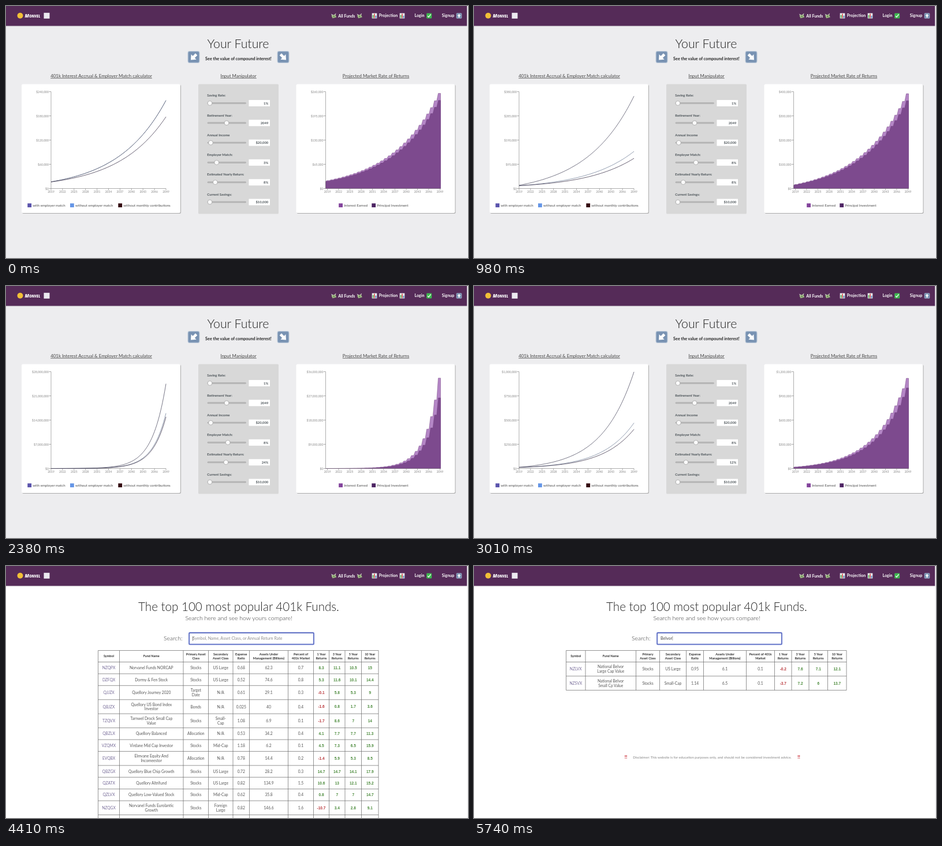
Write an HTML page that moves like this. It is 800x437 px and loops after 5810 ms.

```html
<!DOCTYPE html>
<html lang="en">
<head>
<meta charset="utf-8">
<title>Compound interest demo</title>
<style>
  html, body { margin: 0; width: 100%; height: 100%; overflow: hidden; background: #fff; }
  svg { display: block; width: 100vw; height: 100vh; }
  text { font-family: Lato, "Open Sans", sans-serif; white-space: pre; }
  .num { font-family: "Liberation Sans", sans-serif; }
  .brand { font-family: "Open Sans", sans-serif; font-style: italic; font-variant: small-caps; }
  .under { text-decoration: underline; text-decoration-thickness: .5px; text-underline-offset: 1.2px; }
</style>
</head>
<body>
<svg id="stage" viewBox="0 0 800 437" preserveAspectRatio="none"></svg>
<script>
const LOOP = 5810, STEP = 70, CHART_LAG = 140;
const PAGE_SWITCH = 3430, HOVER = [3360, 3990];
const TYPING = [[4830, "B"], [4970, "Be"], [5040, "Bel"], [5110, "Belv"], [5180, "Belvo"], [5250, "Belvor"]];
const MATCH = [[-140, 0], [0, 3], [700, 8]];
const RATE = [[1190, 8], [1610, 25], [1750, 27], [2030, 28], [2240, 28], [2800, 12]];

// Columns: symbol, name, primary, secondary, expense, assets, share, returns x4.
// "|" breaks a line in the wide layouts, "~" in the narrow one.
const HEAD = "Symbol;Fund Name;Primary~Asset|Class;Secondary|~Asset Class;Expense|~Ratio;Assets Under|~Management (Billions);Percent of|401k~Market;1 Year|~Returns;3 Year|~Returns;5 Year|~Returns;10 Year|~Returns".split(";");
const FUNDS = `NZQPX;Norvanel Funds NORCAP;Stocks;US Large;0.68;62.3;0.7;8.3;11.1;10.5;15
DZFQX;Dormy & Fen Stock;Stocks;US Large;0.52;74.6;0.8;5.3;11.6;10.1;14.4
QJJZX;Quellory Journey 2020;Target|Date;N/A;0.61;29.1;0.3;-0.1;5.8;5.3;9
QBJZX;Quellory US Bond Index|Investor;Bonds;N/A;0.025;40;0.4;-1.6;0.8;1.7;3.6
TZQVX;Tarnwel Drock Small Cap|Value;Stocks;Small-|Cap;1.08;6.9;0.1;-1.7;8.6;7;14
QBZLX;Quellory Balanced;Allocation;N/A;0.53;34.2;0.4;4.1;7.7;7.7;11.3
VZQMX;Virdane Mid Cap Investor;Stocks;Mid-Cap;1.18;6.2;0.1;4.5;7.3;6.5;15.9
EVQBX;Elmvane Equity And|Incomeestor;Allocation;N/A;0.78;14.4;0.2;-1.4;5.9;5.3;8.5
QBZGX;Quellory Blue Chip Growth;Stocks;US Large;0.72;28.2;0.3;14.7;14.7;14.1;17.9
QZATX;Quellory Altrifund;Stocks;US Large;0.82;134.9;1.5;10.6;13;12.1;15.2
QZLVX;Quellory Low-Valued Stock;Stocks;Mid-Cap;0.62;35.8;0.4;0.8;7;7;14.7
NZQGX;Norvanel Funds Eurolantic|Growth;Stocks;Foreign|Large;0.82;146.6;1.6;-10.7;3.4;2.8;9.1
DZFBX;Dormy & Fen Balanced;Allocation;N/A;0.53;15.8;0.2;3.2;8.5;7.7;12.1
TZCQX;Tarbon Capital|Appreciation;Stocks;US Large;1.03;29.5;0.3;11.4;12.8;12.8;16
HZQBX;Halberten Dorvin|Origins;Stocks;Small-|Cap;1.02;9.9;0.1;5;10;7.5;13.1
NZLVX;National Belvor~Large|Cap Value;Stocks;US Large;0.95;6.1;0.1;-0.2;7.6;7.1;12.1
TZJNX;Tarbon Internationalestor;Stocks;Foreign|Large;1.09;12.7;0.1;-11.9;-0.4;-1.3;7.3
NZSVX;National Belvor~Small|Cp Value;Stocks;Small-|Cap;1.14;6.5;0.1;-3.7;7.2;6;13.7
TWQZX;Thornwaldian West Total|Return Bd M;Bonds;N/A;0.67;71.1;0.8;-1.4;0.8;1.7;5.6
ZZTAX;ZELVO Total Return A;Bonds;N/A;0.89;69.2;0.8;-1.6;1.4;1.7;4.7`.split("\n").map(r => r.split(";"));
const COLS = {
  all: [159.5, 196.5, 307, 350.5, 393, 421.5, 488.5, 532.5, 559.5, 587, 615.5, 645],
  some: [159.5, 196.5, 292, 335, 379, 408.5, 479, 525.5, 554, 583.5, 613, 645],
  few: [159.5, 193, 280.5, 321.5, 367.5, 397.5, 471.5, 520.5, 550, 580, 612.5, 645]
};

const range = n => [...Array(n).keys()];
const money = v => "$" + Math.round(v).toLocaleString("en-US");
const escape = s => String(s).replace(/&/g, "&amp;");

function ramp(keys, t) {
  const i = keys.findIndex(k => k[0] > t);
  if (i === 0) return keys[0][1];
  if (i < 0) return keys[keys.length - 1][1];
  const [t0, a] = keys[i - 1], [t1, b] = keys[i];
  return Math.round(a + (b - a) * (t - t0) / (t1 - t0));
}

// y is the visual middle of the line
function text(x, y, str, size, o = {}) {
  const { weight = 400, fill = "#333", anchor = "start", cls = "" } = o;
  return `<text x="${x}" y="${y + size * .35}" font-size="${size}" font-weight="${weight}" fill="${fill}" text-anchor="${anchor}" class="${cls}">${escape(str)}</text>`;
}
const middle = (x, y, str, size, o) => text(x, y, str, size, { ...o, anchor: "middle" });
const rect = (x, y, w, h, fill, extra = "") => `<rect x="${x}" y="${y}" width="${w}" height="${h}" fill="${fill}" ${extra}/>`;
const line = (d, stroke, width, fill = "none") => `<path d="${d}" stroke="${stroke}" stroke-width="${width}" fill="${fill}"/>`;
const at = (x, y, content, scale = 1) => `<g transform="translate(${x} ${y}) scale(${scale})">${content}</g>`;

// Icons are drawn around 0,0 about nine units wide
const bars = rect(-4.3, -4.5, 8.6, 9, "#eef1f3") + rect(-3.2, -1.5, 1.7, 5.2, "#4caf50") +
  rect(-.8, -3.6, 1.7, 7.3, "#d9534f") + rect(1.6, -.2, 1.7, 3.9, "#3f7fc4");
const cash = line("M-4.8 -3.6L0 -1L4 -4.4L2.4 .6L4.8 1.4L0 3Z", "none", 0, "#f1f1ec") +
  line("M-4 -.5L2.6 -2.2L4.4 2.4L-2 4.2Z", "#6d8a5c", .4, "#a9bf8d") + `<circle cx=".3" cy="1" r="1.2" fill="#5f8052"/>`;
const check = rect(-4.5, -4.5, 9, 9, "#3fb950", 'rx="1.2"') + line("M-2.6 .2L-.8 2.3L2.8 -2.6", "#fff", 1.3);
const arrowBox = angle => rect(-4.5, -4.5, 9, 9, "#7892b2", 'rx="1.3" stroke="#b4c4d6" stroke-width=".5"') +
  `<path transform="rotate(${angle})" d="M0 -3.2L2.9 .1H1.1V3H-1.1V.1H-2.9Z" fill="#fff"/>`;

function nav(t) {
  const hover = t >= HOVER[0] && t < HOVER[1];
  const label = (x, s) => middle(x, 17, s, 7.1, { weight: 700, fill: "#fff" });
  const funds = at(-26.8 + 4.5, 0, cash) + middle(0, 0, "All Funds", 7.1, { weight: 700, fill: "#fff" }) + at(22.3, 0, cash);
  return rect(0, 0, 798.5, 34.5, "#552b58") + rect(0, 34.5, 798.5, .8, "#000", 'opacity=".14"') +
    rect(798.5, 0, 1.5, 437, "#f4f4f5") +
    `<circle cx="24.5" cy="16.7" r="5" fill="#f2c037"/>` +
    text(32.5, 16.8, "Monvel", 8.2, { weight: 800, fill: "#fff", cls: "brand" }) +
    rect(65.5, 11.8, 10, 10, "#eceaf0") +
    at(589.8, 17, funds, hover ? 1.1 : 1) +
    at(638, 17, bars) + label(662, "Projection") + at(686, 17, bars) +
    label(716, "Login") + at(732.7, 17, check) +
    label(765.5, "Signup") + at(784.5, 17, arrowBox(0));
}

// Balance after u of the 30 years with a yearly contribution paid monthly
function balance(u, rate, yearly) {
  const r = rate / 1200, growth = (1 + r) ** (12 + 360 * u);
  return 10000 * growth + yearly / 12 * (growth - 1) / r;
}

function niceMax(max) {
  const rough = max / 4, unit = 10 ** (Math.floor(Math.log10(rough)) + 1) / 20;
  return 4 * Math.ceil(rough / unit - 1e-9) * unit;
}

function model(t) {
  const match = ramp(MATCH, t), rate = ramp(RATE, t), full = 200 * (1 + match);
  const end = balance(1, rate, full);
  return { match, rate, full, maxL: niceMax(end), maxR: niceMax(end * (1 + rate / 100)) };
}

const BASE = 316.5, HEIGHT = 168, WIDTH = 199;
const py = (v, max) => BASE - HEIGHT * v / max;

function axes(x, max, firstLabel, labelStep) {
  const grey = { fill: "#858585" };
  let d = `M${x} ${BASE - HEIGHT}V${BASE}H${x + WIDTH}`, labels = "";
  for (const i of range(5)) {
    const y = BASE - HEIGHT * i / 4;
    d += `M${x - 3.5} ${y}H${x}`;
    labels += text(x - 4, y + .3, money(max * i / 4), 5.1, { ...grey, anchor: "end" });
  }
  for (const i of range(11)) {
    const lx = firstLabel + i * labelStep;
    d += `M${lx} ${BASE}v3`;
    labels += middle(lx, 322.7, 2019 + 3 * i, 5, grey);
  }
  return line(d, "#777", .6) + labels;
}

function growthChart(now, shown) {
  const curve = (yearly, colour) => line("M" + range(91).map(i =>
    `${78 + WIDTH * i / 90} ${py(balance(i / 90, shown.rate, yearly), shown.maxL).toFixed(2)}`).join("L"), colour, .8);
  return axes(78, now.maxL, 78, 19.9) + curve(shown.full, "#555468") + curve(200, "#76859c") + curve(0, "#40384f");
}

function returnsChart(now, shown) {
  const year = WIDTH / 30;
  const area = (factor, fill) => {
    let d = `M553.5 ${BASE}`;
    for (const n of range(31)) {
      const y = py(balance(n / 30, shown.rate, shown.full) * factor, shown.maxR).toFixed(2);
      d += `L${553.5 + Math.max(0, n - .6) * year} ${y}H${553.5 + n * year}`;
    }
    return line(d + `V${BASE}Z`, "#71407f", .5, fill);
  };
  return area(1 + shown.rate / 100, "#b486c6") + area(1, "#7d4a8e") + axes(553.5, now.maxR, 556.5, 19.5);
}

const card = (x, y, w, h) => rect(x + 1, y + 1, w, h, "#aaa", 'rx="2.5"') + rect(x, y, w, h, "#fff", 'rx="2.5"');
const legend = (x, colour, str) => rect(x, 342.3, 6.8, 6.8, colour) + text(x + 9, 345.8, str, 6.1, { fill: "#4d4d4d" });

function slider(i, label, thumb, value) {
  const y = 155.2 + 34.3 * i, ty = y + 13.3, ink = { weight: 700, fill: "#4a5257" };
  return text(348.3, y, label, 5.9, ink) +
    rect(349, ty - 1, 66.5, 2, "#bdbdbd", 'rx="1" stroke="#949494" stroke-width=".5"') +
    `<circle cx="${thumb}" cy="${ty}" r="3.9" fill="#fafafa" stroke="#8e8e8e" stroke-width=".6"/>` +
    rect(420.5, ty - 5.5, 36.5, 11, "#fff") + text(454.3, ty + .2, value, 5.9, { ...ink, anchor: "end" });
}

function projectionPage(t) {
  const now = model(t), shown = model(t - CHART_LAG);
  const title = (x, s) => middle(x, 121, s, 7.9, { fill: "#444", cls: "under" });
  return rect(0, 0, 800, 437, "#ededef") +
    middle(402, 65.7, "Your Future", 21.3, { weight: 300, fill: "#222" }) +
    at(325, 88.5, arrowBox(-135), 2.2) + at(480, 88.5, arrowBox(135), 2.2) +
    middle(402.5, 91, "See the value of compound interest!", 7.2, { weight: 700, fill: "#222" }) +
    title(165, "401k Interest Accrual & Employer Match calculator") +
    title(402.5, "Input Manipulator") + title(640.5, "Projected Market Rate of Returns") +
    card(27, 135.5, 275, 223.5) + rect(333, 135.5, 139, 225, "#d8d8d8", 'rx="1.5"') + card(502.5, 135.5, 275, 223.5) +
    growthChart(now, shown) + returnsChart(now, shown) +
    legend(37.3, "#5a53ac", "with employer match") + legend(111, "#6495e6", "without employer match") +
    legend(194.3, "#330a10", "without monthly contributions") +
    legend(576.2, "#83439c", "Interest Earned") + legend(633.3, "#4d2463", "Principal Investment") +
    slider(0, "Saving Rate:", 353, "1%") +
    slider(1, "Retirement Year:", 382, "2049") +
    slider(2, "Annual Income", 354.5, "$20,000") +
    slider(3, "Employer Match:", 353 + 3.9 * now.match, now.match + "%") +
    slider(4, "Estimated Yearly Return:", 353 + 1.16 * now.rate, now.rate + "%") +
    slider(5, "Current Savings:", 353, "$10,000");
}

function breakLines(str, narrow) {
  const [cut, join] = narrow ? ["~", "|"] : ["|", "~"];
  return str.replace("|~", cut).replace("-" + join, "-").replace(join, " ").split(cut);
}

function fundTable(query) {
  const narrow = query.length > 1;
  const cols = COLS[narrow ? "few" : query ? "some" : "all"];
  const rows = FUNDS.filter(r => r.join(" ").toLowerCase().includes(query.toLowerCase()));
  const cell = (lines, col, y, size, gap, style) => lines.map((s, i) =>
    middle((cols[col] + cols[col + 1]) / 2, y + (i - (lines.length - 1) / 2) * gap, s, size, style)).join("");

  let out = HEAD.map((h, c) => cell(breakLines(h, narrow), c, 156.5, 5.5, 6.3, { weight: 700, fill: "#2c2c2c" })).join("");
  let y = 166.5, d = "M159.5 146.5H645M159.5 166.5H645";
  for (const row of rows) {
    if (y > 437) break;
    const cells = row.map(s => breakLines(s, narrow));
    const h = cells.some(l => l.length > 1) ? 24.45 : 20.4;
    cells.forEach((lines, c) => {
      const style = c > 6 ? { weight: 700, fill: row[c] < 0 ? "#b9383c" : "#4a8a3a", cls: "num" }
        : { fill: c ? "#565656" : "#766b98" };
      out += cell(lines, c, y + h / 2 + .2, c > 6 ? 6.5 : 6.7, 7.6, style);
    });
    y += h;
    d += `M159.5 ${y}H645`;
  }
  d += cols.map(x => `M${x} 146.5V${y}`).join("");
  const note = "Disclaimer: This website is for education purposes only, and should not be considered investment advice.";
  const mark = x => middle(x, y + 116.3, "!!", 7.6, { weight: 900, fill: "#c9303a" });
  return line(d, "#666", .7) + out + mark(263) + mark(562.5) + middle(412.5, y + 116.3, note, 6, { fill: "#858585" });
}

function fundsPage(t) {
  const typed = TYPING.filter(k => k[0] <= t).pop();
  const query = typed ? typed[1] : "";
  const field = query ? text(323, 126, query + "|", 7.1, { fill: "#444" })
    : text(323.5, 126, "Symbol, Name, Asset Class, or Annual Return Rate", 7.1, { fill: "#8c8c8c" }) + rect(323, 122, .6, 8, "#333");
  return rect(0, 0, 800, 437, "#fff") +
    middle(403, 70.5, "The top 100 most popular 401k Funds.", 20.6, { weight: 300, fill: "#222" }) +
    middle(403, 90.5, "Search here and see how yours compare!", 10.5, { weight: 300, fill: "#333" }) +
    text(273, 125.5, "Search:", 10.4, { weight: 300, fill: "#333" }) +
    rect(317, 115.7, 216, 20.3, "#fff", 'rx="1.5" stroke="#a9b6ea" stroke-width="2.4"') +
    rect(317.2, 115.9, 215.6, 19.9, "none", 'rx="1" stroke="#4656b4" stroke-width="1.1"') +
    field + fundTable(query);
}

const stage = document.getElementById("stage");
let last = -1;
function draw() {
  const t = Math.floor(performance.now() % LOOP / STEP) * STEP;
  if (t !== last) {
    last = t;
    stage.innerHTML = (t < PAGE_SWITCH ? projectionPage(t) : fundsPage(t)) + nav(t);
  }
  requestAnimationFrame(draw);
}
draw();
</script>
</body>
</html>
```
